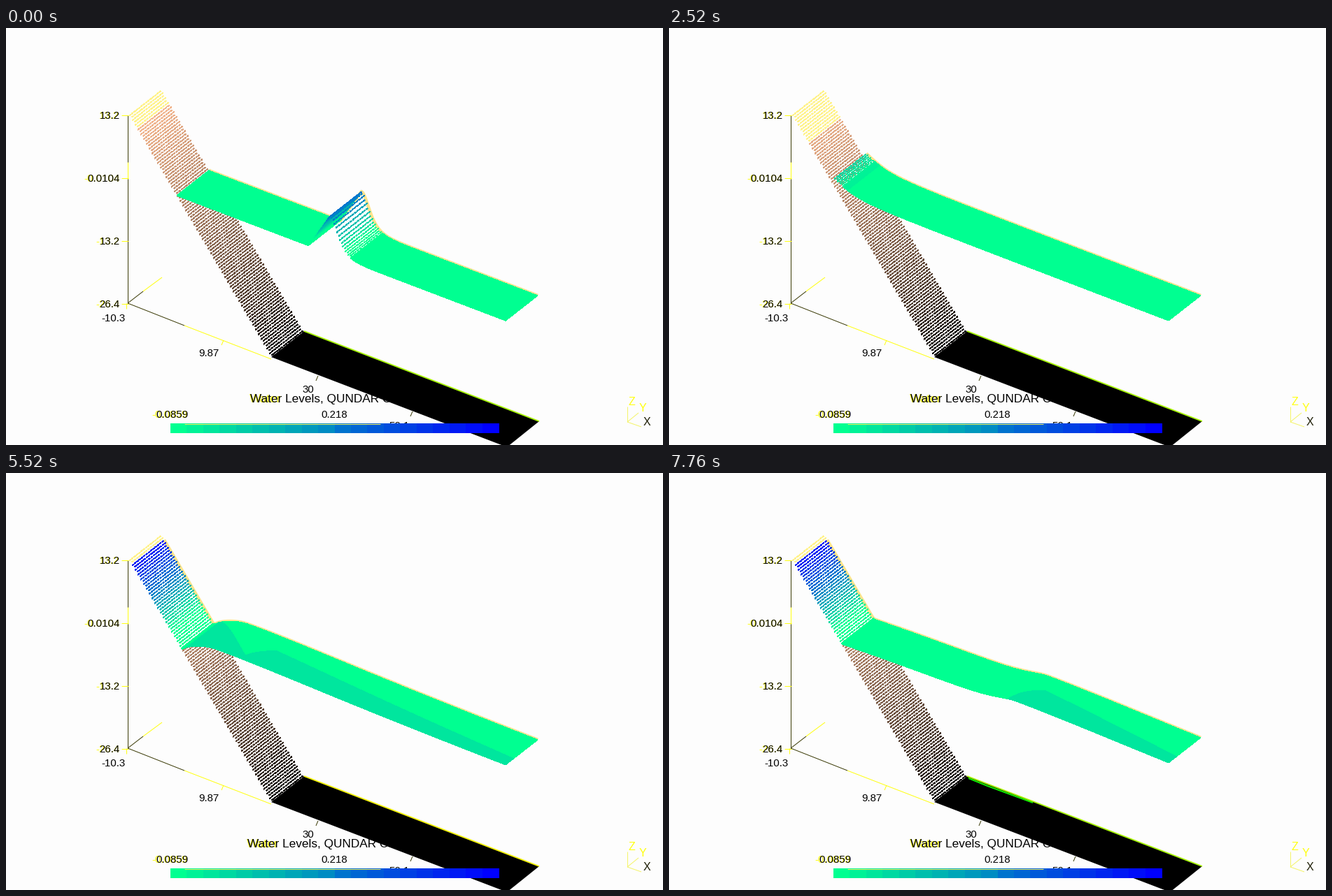
A matplotlib script that plays this animation: 939x597 px, repeating every 8 s.

```python
import numpy as np
import matplotlib.pyplot as plt
from matplotlib.animation import FuncAnimation
from matplotlib.collections import PolyCollection

W, H, DPI = 939, 597, 64
STEPS, INTERVAL = 32, 250
PT = 72 / DPI
YELLOW, OLIVE = "#ffff10", "#3c3c08"

ACROSS = np.array([46, -36])          # front edge to back edge
NORMAL = np.array([0.619, 0.786])     # across the mesh rows
TOP, SHORE, END = 176, 244, 715       # front edge: slope top, shoreline, end
DASHES = 14


def clamp(v, low=0.0, high=1.0):
    return np.clip(v, low, high)


def ease(u):
    u = clamp(u)
    return u * u * (3 - 2 * u)


def sech(v):
    return 1 / np.cosh(v)


def bed(x):
    return 125 + 1.704 * (x - TOP)


def still(x):
    return 240 + 0.381 * (x - SHORE)


def incoming(x, s):
    """Steep wave running to the shore, growing wider and lower."""
    d = x - (462 - 25 * s)
    front = clamp(1 + d / (30 - 2.3 * min(s, 9)))
    back = sech(d / (10 + 1.7 * s))
    height = (53 - 2.8 * s) * clamp((14 - s) / 5)
    return height * np.where(d < 0, front, back)


def crest(s):
    return 299 + 22 * (s - 22)


def reflected(x, s):
    """Low wave running back out, with a dip left at the shore."""
    d = x - crest(s)
    hump = 9.5 * sech(d / np.where(d > 0, 150, 25)) * clamp((s - 8) / 4)
    late = max(s - 22, 0)
    dip = 14 * clamp((s - 16) / 6) * np.exp(-late / 7)
    return hump - dip * np.exp(-(x - 250) / (15 + 9 * late))


def surface(s):
    tip = SHORE - 64 * ease((s - 8.5) / 6.5)
    x = np.arange(TOP, END, 2.0)
    x = x[x >= tip - 1]
    rise = still(x) - bed(x)
    climb = clamp(min((s - 8) / 3, (18 - s) / 4))
    film = 10 * climb * clamp((x - tip) / 20)
    soft = 1 + 15 * climb
    level = incoming(x, s) + reflected(x, s)
    h = soft * np.logaddexp(level / soft, (rise + film) / soft)
    return x, np.minimum(bed(x), still(x) - h)


def shade(x, s):
    """Share of the width, from the front, under the darker contour."""
    start = max(335, crest(s) - 12)
    peak = clamp(0.4 + 0.05 * (s - 18), 0.4, 0.62)
    slant = peak + (0.25 - peak) * (x - start) / (END - start)
    v = slant * np.sqrt(clamp((x - start) / 25))
    v = np.where(x < 575 + 26 * (s - 14), v, 0)
    near = clamp(min(s - 12, (24 - s) / 2))
    return np.maximum(v, near * clamp(1 - (x - 262) / 85) * (x > 256))


def ramp(t):
    t = np.round(clamp(t) * 20) / 20
    return np.column_stack([0 * t, 1 - t, 0.57 + 0.43 * t])


def strips(x, y, colors):
    """Rows across the width: solid where flat, dashed where stretched."""
    pts = np.column_stack([x, y])
    polys, fills = [], []
    for i, d in enumerate(np.diff(pts, axis=0)):
        n = d @ NORMAL
        if n < 2.6:
            cells, part = [(0, 1)], 1
        else:
            start = (np.arange(DASHES) + 0.5 * (i % 2)) / DASHES
            cells = [(a, min(a + 0.62 / DASHES, 1)) for a in start]
            part = 1 / n
        for a, b in cells:
            p, q = pts[i] + ACROSS * a, pts[i] + ACROSS * b
            polys.append([p, q, q + d * part, p + d * part])
            fills.append(colors[i])
    return polys, fills


def bed_rows(s):
    x = np.arange(TOP, 381, 2.0)
    u = (x - TOP) / 205
    rgb = (1 - u[:, None]) ** 0.8 * np.array([1, 0.75, 0.59])
    rgb[u < 0.05 + 0.01 * min(s, 6)] = (1, 0.95, 0.55)
    return strips(x, bed(x), rgb)


fig = plt.figure(figsize=(W / DPI, H / DPI), dpi=DPI, facecolor="#fdfdfd")
ax = fig.add_axes([0, 0, 1, 1])
ax.set_xlim(0, W)
ax.set_ylim(H, 0)
ax.axis("off")


def line(points, color, width=1, z=1):
    xs, ys = zip(*points)
    return ax.plot(xs, ys, color=color, lw=width * PT, zorder=z,
                   solid_capstyle="butt")[0]


def label(x, y, text, size=15, color="black", ha="center"):
    return ax.text(x, y, text, fontsize=size * PT, color=color, ha=ha,
                   va="center_baseline", family="Liberation Sans", zorder=8)


def collection(z):
    c = PolyCollection([], edgecolors="none", antialiaseds=False, zorder=z)
    ax.add_collection(c, autolim=False)
    return c


# Axes
line([(174, 125), (174, 394)], OLIVE)
line([(174, 192), (174, 216)], YELLOW)
line([(174, 394), (255, 426)], OLIVE)
line([(255, 426), (379, 474)], YELLOW)
line([(174, 394), (196, 377)], OLIVE)
line([(196, 377), (223, 357)], YELLOW)
for k, text in enumerate(["13.2", "-0.0104", "-13.2", "-26.4"]):
    y = 125 + 90 * k
    line([(165, y), (175, y)], YELLOW)
    label(162.3, y, text, color=YELLOW, ha="right")
    label(163, y, text.lstrip("-"), ha="right")
line([(172, 394), (172, 402)], YELLOW)
for k, color in enumerate([YELLOW, OLIVE, OLIVE]):
    x, y = 311 + 135 * k, 447 + 51 * k
    line([(x, y), (x - 3, y + 7)], color)
label(153, 414, "-10.3")
label(290, 465, "9.87")
label(432, 517, "30")
label(562, 568, "50.1")

# Floor
ax.add_patch(plt.Polygon([(379, 471), (426, 434), (762, 563), (716, 600)],
                         fc="black", ec="none", zorder=2))
rim = line([(426, 434), (762, 563)], YELLOW, 1.8, 3)
wedge = line([(428, 437), (455, 448), (520, 472)], "#10f000", 2, 2.5)

# Colour bar
BAR_X, BAR_W = 235, 469
for k, c in enumerate(ramp(np.arange(20) / 19)):
    ax.add_patch(plt.Rectangle((BAR_X + k * BAR_W / 20, 566), BAR_W / 20 + 0.5,
                               14, fc=c, ec="none", zorder=9, aa=False))
line([(255, 566.5), (535, 566.5)], "#f0f060", 1, 10)
label(234.3, 552, "-0.0859", color=YELLOW)
label(260.5, 552, "0.0859", ha="right")
label(469, 552, "0.218")
tint = label(348, 530, "Water", 17.3, YELLOW, "left")
title = label(349, 530, "Water Levels, QUNDAR C", 17.3, ha="left")

# Orientation mark
for end in [(888, 542), (904, 551), (908, 571)]:
    line([(888, 564), end], "#f4f468")
label(894, 534, "Z", 16, YELLOW)
label(910, 543, "Y", 16, YELLOW)
label(916, 563, "X", 16, "#202008")

slope, water, band = collection(4), collection(6), collection(7)
band.set_facecolor([(0, 0.9, 0.62)])
edge = line([(0, 0), (1, 1)], "#ffe48c", 4.6, 5)


def draw(step):
    polys, fills = bed_rows(step)
    slope.set_verts(polys)
    slope.set_facecolor(fills)

    x, y = surface(step)
    polys, fills = strips(x, y, ramp((still(x) - y - 10) / 80))
    water.set_verts(polys)
    water.set_facecolor(fills)
    edge.set_data(x + ACROSS[0], y + ACROSS[1])

    front = np.column_stack([x, y])
    inner = front + shade(x, step)[:, None] * ACROSS
    keep = x > 256
    band.set_verts([np.vstack([front[keep], inner[keep][::-1]])])
    band.set_visible(step > 12)

    rim.set_color("#a8f800" if step < 11 or step > 24 else "#f4f400")
    wedge.set_visible(step > 24)
    left = 349 if step < 2 else 337 if step < 10 else 345
    title.set_x(left)
    tint.set_x(left - 1)
    return slope, water, band, edge, rim, wedge, title, tint


anim = FuncAnimation(fig, draw, frames=STEPS, interval=INTERVAL,
                     repeat=True, repeat_delay=0, blit=False)
plt.show()
```
